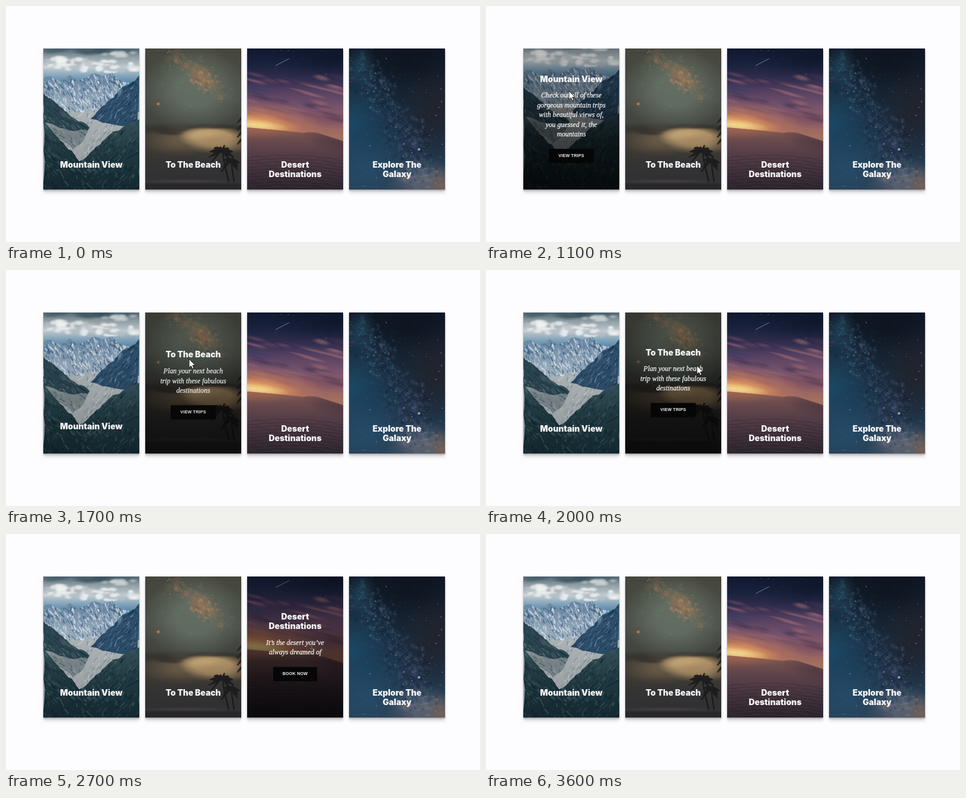
Write an HTML page with a canvas that moves like this. It is 800 by 400 pixels and loops after 3.7 s.

```html
<!DOCTYPE html>
<html lang="en">
<head>
<meta charset="utf-8">
<title>Trip cards</title>
<style>
html, body { margin: 0; width: 100%; height: 100%; overflow: hidden; background: #fdfcff; }
#stage { position: relative; width: 800px; height: 400px; overflow: hidden; }
.card {
  position: absolute; top: 72px; width: 161.2px; height: 238.6px; overflow: hidden;
  color: #f5f5f5; text-align: center; background: #222;
  box-shadow: 0 1px 1px rgba(0,0,0,.1), 0 2px 2px rgba(0,0,0,.1),
    0 3px 3px rgba(0,0,0,.1), 0 6px 5px rgba(0,0,0,.12);
}
canvas { position: absolute; left: 0; top: 0; }
.shade {
  position: absolute; left: 0; top: 0; width: 100%; height: 200%;
  background: linear-gradient(transparent 0, rgba(0,0,0,.034) 22%, rgba(0,0,0,.123) 39%,
    rgba(0,0,0,.249) 53%, rgba(0,0,0,.394) 64%, rgba(0,0,0,.54) 74%,
    rgba(0,0,0,.668) 84%, rgba(0,0,0,.762) 94%, rgba(0,0,0,.8) 100%);
}
.content { position: absolute; left: 0; top: 0; width: 100%; white-space: pre; }
.title { font: 900 13.9px/16.4px Inter, "Open Sans", sans-serif; }
.copy { margin-top: 10.9px; font: italic 11.8px/16.4px "Liberation Serif", serif; -webkit-text-stroke: .25px; }
.btn {
  display: inline-block; margin-top: 16.4px; padding: 0 16px; background: #060607;
  font: bold 7.2px/24.3px "Liberation Sans", sans-serif; letter-spacing: .17px;
}
#cursor { position: absolute; left: 0; top: 0; overflow: visible; }
</style>
</head>
<body>
<div id="stage">
  <svg id="cursor" width="1" height="1">
    <path id="arrow" d="M0 0V14.5L3.4 11.4 5.7 16.5 8 15.5 5.8 10.5H10.3Z" fill="#fff" stroke="#111" stroke-width=".9"/>
    <path id="beam" d="M-3 -6.5H-.8L0 -5.8 .8 -6.5H3M0 -5.8V5.8M-3 6.5H-.8L0 5.8 .8 6.5H3" fill="none" stroke="#777" stroke-width="1"/>
  </svg>
</div>
<script>
const W = 162, H = 262, LOOP = 3700, STEP = 100, REST = 188.8;
let c, seed;

function rnd() {
  seed = (seed + 0x6D2B79F5) | 0;
  let t = Math.imul(seed ^ (seed >>> 15), 1 | seed);
  t = (t + Math.imul(t ^ (t >>> 7), 61 | t)) ^ t;
  return ((t ^ (t >>> 14)) >>> 0) / 4294967296;
}
const spread = (mid, range) => mid + (rnd() + rnd() - 1) * range;
const pick = list => list[Math.floor(rnd() * list.length)];

function wash(y0, y1, ...stops) {
  const g = c.createLinearGradient(0, y0, 0, y1);
  stops.forEach(([at, color]) => g.addColorStop(at, color));
  return g;
}

// An elliptic light; core is the share of the radius at full strength
function glow(x, y, rx, ry, rgb, alpha, turn = 0, core = 0) {
  const g = c.createRadialGradient(0, 0, 0, 0, 0, 1);
  g.addColorStop(core, `rgba(${rgb},${alpha})`);
  g.addColorStop((1 + core) / 2, `rgba(${rgb},${alpha * .5})`);
  g.addColorStop(1, `rgba(${rgb},0)`);
  c.save();
  c.translate(x, y);
  c.rotate(turn);
  c.scale(rx, ry);
  c.fillStyle = g;
  c.fillRect(-1, -1, 2, 2);
  c.restore();
}

// A closed outline roughened by midpoint displacement
function ridge(pts, rough) {
  for (let k = 0; k < 3; k++) {
    pts = pts.flatMap(([x, y], i) => {
      const [u, v] = pts[(i + 1) % pts.length];
      const d = Math.min(1, Math.hypot(u - x, v - y) / 20) * rough;
      return [[x, y], [spread((x + u) / 2, d), spread((y + v) / 2, d)]];
    });
  }
  const p = new Path2D();
  pts.forEach(([x, y]) => p.lineTo(x, y));
  p.closePath();
  return p;
}

function slope(pts, fill, tones, n, lean, rough = 3) {
  const p = ridge(pts, rough);
  const xs = pts.map(q => q[0]), ys = pts.map(q => q[1]);
  const x0 = Math.min(...xs), y0 = Math.min(...ys);
  const w = Math.max(...xs) - x0, h = Math.max(...ys) - y0;
  c.save();
  c.clip(p);
  c.fillStyle = fill;
  c.fillRect(0, 0, W, H);
  c.globalAlpha = .55;
  for (let i = 0; i < n; i++) {
    const x = x0 + rnd() * w, y = y0 + rnd() * h, l = 2 + rnd() * 7;
    c.strokeStyle = pick(tones);
    c.lineWidth = .7 + rnd() * 2;
    c.beginPath();
    c.moveTo(x, y);
    c.lineTo(x + l * spread(lean, .9), y + l);
    c.stroke();
  }
  c.restore();
}

function stars(n, place, tones, size) {
  for (let i = 0; i < n; i++) {
    const [x, y] = place();
    const s = .4 + rnd() * rnd() * size;
    c.globalAlpha = .25 + rnd() * .6;
    c.fillStyle = pick(tones);
    c.fillRect(x, y, s, s);
  }
  c.globalAlpha = 1;
}
const anywhere = () => [rnd() * W, rnd() * H];

function mountain() {
  c.fillStyle = wash(0, 64, [0, '#4f6672'], [.22, '#8f9da3'], [.5, '#c3ccd0'], [.75, '#7fa3bb'], [1, '#4d7f a0'.replace(' ', '')]);
  c.fillRect(0, 0, W, H);
  for (let i = 0; i < 12; i++) glow(rnd() * W, rnd() * 9, 18, 6, '58,80,92', .6);
  for (let i = 0; i < 16; i++) glow(spread(125, 36), spread(10, 5), 9, 4, '206,212,214', .5, 0, .3);
  for (let i = 0; i < 60; i++) {
    const x = rnd() * W;
    glow(x, spread(27 + x / 40, 13), 5 + rnd() * 9, 3 + rnd() * 5, pick(['246,247,247', '234,237,238', '182,192,197']), .75, 0, .35);
  }
  slope([[0, 52], [12, 47], [30, 56], [44, 45], [56, 54], [70, 50], [86, 42], [100, 47], [116, 41], [126, 52], [144, 58], [150, 124], [0, 124]],
    wash(40, 124, [0, '#6383a3'], [.5, '#8da5ba'], [1, '#b2c0cb']),
    ['#f1f4f6', '#34587b', '#d5dfe7', '#2b4c6c', '#e6ecf0', '#7493ae', '#fff'], 620, .4);
  slope([[0, 108], [W, 108], [W, H], [0, H]], '#b0b8bb', ['#d6dadb', '#8b989e', '#c3c9cb', '#77878e', '#e2e4e4'], 420, -.7, 0);
  slope([[162, 46], [152, 56], [138, 63], [124, 76], [108, 90], [92, 106], [80, 119], [104, 126], [162, 132]],
    '#2f506c', ['#1b3a55', '#4c7497', '#15304a', '#7f9aab', '#24466a'], 320, -.8);
  slope([[0, 76], [16, 88], [36, 106], [60, 124], [78, 134], [74, 141], [52, 142], [24, 134], [0, 126]],
    '#2a4652', ['#152c37', '#4c656a', '#6b7c7e', '#213d48'], 200, .9);
  slope([[0, 124], [24, 132], [52, 140], [76, 140], [66, 158], [50, 172], [34, 158], [14, 142]],
    '#7f8c90', ['#56686f', '#a5aeb0', '#3f555d', '#8f9a9d'], 130, .9);
  slope([[162, 120], [134, 133], [112, 146], [94, 164], [74, 182], [60, 192], [76, 222], [100, 262], [162, 262]],
    wash(120, 250, [0, '#3a5560'], [.4, '#244049'], [1, '#17323d']), ['#10262f', '#3f5d62', '#18323d', '#566d6c'], 420, -.8);
  slope([[0, 124], [18, 144], [34, 160], [50, 176], [62, 192], [78, 222], [102, 262], [0, 262]],
    wash(124, 250, [0, '#35505a'], [.4, '#223d46'], [1, '#17313b']), ['#0f242d', '#3f5a5c', '#17303a', '#5b7172'], 360, .8);
  for (let i = 0; i < 14; i++) glow(spread(78, 30), spread(196, 30), 4 + rnd() * 6, 2 + rnd() * 3, '142,156,160', .3, .9);
}

function frond(x, y, angle, len) {
  const dx = Math.cos(angle) * len, dy = Math.sin(angle) * len;
  const curve = t => [x + dx * t, y + dy * t + 9 * t * t];
  c.lineWidth = 1.6;
  c.beginPath();
  for (let t = 0; t <= 1.001; t += .1) {
    const [u, v] = curve(t);
    c.moveTo(u, v);
    c.lineTo(u + dx * .14 - 1, v + 6 * Math.sin(Math.PI * (.2 + t * .7)));
    c.moveTo(u, v);
    c.lineTo(...curve(t + .1));
  }
  c.stroke();
}

function palm(x, y, footX, len) {
  c.strokeStyle = '#202122';
  c.lineWidth = 2.4;
  c.beginPath();
  c.moveTo(x, y);
  c.quadraticCurveTo(x + 2, y + 18, footX, 226);
  c.stroke();
  for (let i = 0; i < 10; i++) frond(x, y, -Math.PI * 1.15 + i * Math.PI * 1.3 / 9, spread(len, 4));
}

function beach() {
  c.fillStyle = wash(0, H, [0, '#45453c'], [.3, '#4c5149'], [.5, '#454741'], [.56, '#3a3936'], [1, '#343437']);
  c.fillRect(0, 0, W, H);
  glow(84, 70, 86, 76, '104,116,104', .85, 0, .35);
  for (let i = 0; i < 70; i++) {
    const t = rnd();
    glow(spread(46 + t * 88, 24), spread(6 + t * 78, 20), 7, 5, pick(['142,106,82', '134,96,86', '152,122,88', '112,106,92']), .32, .8);
  }
  glow(96, 50, 36, 20, '164,126,86', .55, .75);
  for (let i = 0; i < 40; i++) glow(spread(98, 24), spread(53, 20), 4, 3, pick(['206,162,102', '186,136,86', '150,96,80']), .45, .8);
  for (let i = 0; i < 16; i++) glow(spread(112, 30), spread(58, 26), 5, 2.5, '104,76,70', .4, .8);
  stars(420, () => { const t = rnd(); return [spread(45 + t * 90, 44), spread(t * 92, 36)]; }, ['#c99a70', '#b8767a', '#d6bd90', '#7f9696', '#5c5a50'], 1.3);
  stars(240, () => [rnd() * W, rnd() * 128], ['#949c8c', '#a89f88', '#6c7a70', '#3e423b'], .9);
  glow(22, 94, 4, 4, '222,110,70', .9);
  glow(22, 94, 1.5, 1.5, '255,220,180', 1);
  glow(88, 92, 3, 3, '80,120,150', .6);
  c.fillStyle = wash(126, 146, [0, 'rgba(56,54,50,0)'], [.5, 'rgba(56,54,49,.85)'], [1, '#45413a']);
  c.fillRect(0, 126, W, H);
  glow(60, 156, 66, 28, '122,104,80', .8, 0, .2);
  glow(112, 150, 58, 20, '186,155,110', 1, 0, .55);
  glow(98, 146, 40, 12, '212,180,128', .75, 0, .3);
  glow(124, 162, 56, 18, '176,146,104', .8, 0, .3);
  for (let i = 0; i < 14; i++) glow(spread(30, 36), spread(138, 8), 18, 4, '58,55,50', .6);
  glow(130, 133, 60, 4, '58,55,50', .9);
  c.fillStyle = wash(170, 200, [0, 'rgba(56,55,55,0)'], [1, '#3c3b3d']);
  c.fillRect(0, 170, W, H);
  glow(70, 225, 100, 4, '100,94,84', .6);
  c.fillStyle = '#333335';
  c.fillRect(0, 229, W, H);
  palm(130, 173, 141, 17);
  palm(145, 190, 150, 13);
  c.strokeStyle = '#262724';
  for (let i = 0; i < 4; i++) frond(165, 116 + i * 12, Math.PI * 1.02, 8);
}

function desert() {
  c.fillStyle = wash(0, 150, [0, '#0f182c'], [.2, '#1b243f'], [.36, '#352f50'], [.5, '#5b4464'], [.66, '#7a5670'], [.82, '#96636c'], [1, '#b47a66']);
  c.fillRect(0, 0, W, H);
  glow(150, 14, 110, 40, '13,20,38', .7);
  for (let i = 0; i < 40; i++) {
    const y = 44 + rnd() * 78;
    glow(rnd() * W, y, 14 + rnd() * 26, 2 + rnd() * 4, pick(['66,52,84', '146,98,116', '94,68,98', '160,108,112', '112,76,104']), .55, .24, .3);
  }
  glow(14, 68, 44, 9, '58,62,104', .6, .2);
  glow(140, 118, 60, 18, '116,76,94', .6, .12);
  glow(24, 126, 110, 38, '226,138,92', .85, .12);
  glow(16, 128, 78, 20, '250,180,104', .9, .14, .1);
  glow(16, 130, 56, 10, '255,226,150', .95, .1, .2);
  stars(70, () => [rnd() * W, rnd() * 50], ['#7585a8', '#b4bccf'], .8);
  c.strokeStyle = '#9ca6bb';
  c.lineWidth = .7;
  c.beginPath();
  c.moveTo(48, 29);
  c.lineTo(71, 17);
  c.stroke();
  const dune = new Path2D('M0 134Q50 138 96 143Q108 140 122 144Q144 151 162 157V262H0Z');
  c.save();
  c.clip(dune);
  c.fillStyle = wash(134, H, [0, '#91645c'], [.14, '#775355'], [.4, '#5a424e'], [.7, '#42343f'], [1, '#2c2834']);
  c.fillRect(0, 0, W, H);
  glow(20, 138, 80, 16, '186,112,82', .6);
  glow(150, 160, 60, 20, '78,54,66', .6, .3);
  c.lineWidth = .8;
  for (let i = 0; i < 30; i++) {
    c.strokeStyle = i % 2 ? 'rgba(26,20,32,.32)' : 'rgba(128,94,100,.2)';
    c.beginPath();
    for (let x = 0; x <= W; x += 3) {
      c.lineTo(x, 182 + i * 2.8 - 8 * Math.sin(x / 58) + Math.sin(x / 5 + i * 1.7) + x * .05);
    }
    c.stroke();
  }
  c.restore();
}

function galaxy() {
  c.fillStyle = wash(0, H, [0, '#101724'], [.3, '#172433'], [.6, '#20384f'], [1, '#3c566e']);
  c.fillRect(0, 0, W, H);
  glow(4, 130, 90, 110, '30,90,126', .65);
  glow(30, 215, 90, 66, '44,98,138', .65);
  glow(20, 30, 28, 40, '38,92,120', .6);
  glow(145, 104, 56, 90, '36,36,44', .9);
  glow(100, 20, 80, 50, '13,19,30', .8);
  glow(122, 228, 60, 46, '132,134,150', .75, 0, .1);
  for (let i = 0; i < 300; i++) {
    const t = rnd();
    glow(spread(18 + t * 112, 38), spread(16 + t * 206, 34), 2 + rnd() * 5, 2 + rnd() * 4,
      pick(['66,116,152', '86,86,128', '26,34,52', '44,90,126', '20,28,42']), .32, 1);
  }
  for (let i = 0; i < 70; i++) glow(spread(112, 34), spread(156, 48), 2 + rnd() * 5, 2 + rnd() * 4, pick(['22,26,42', '62,64,98', '104,96,134', '24,28,44']), .42, .9);
  for (let i = 0; i < 90; i++) glow(spread(120, 44), spread(224, 34), 2 + rnd() * 5, 2 + rnd() * 4, pick(['158,158,172', '170,144,132', '96,116,142', '132,140,162']), .32);
  glow(158, 234, 28, 36, '186,140,110', .65);
  stars(600, anywhere, ['#5c93bd', '#86a9c2', '#0e1626', '#54708a'], 1);
  stars(560, () => { const t = rnd(); return [spread(14 + t * 124, 40), spread(20 + t * 220, 34)]; }, ['#7fb4d8', '#cfe2f0', '#a69ad0', '#d8c6bd', '#141c2e'], 1.2);
  for (let i = 0; i < 18; i++) glow(rnd() * W, rnd() * 238, 1.2, 1.2, '214,234,248', .8);
  glow(118, 171, 3, 3, '240,240,255', 1);
}

const cards = [
  { art: mountain, title: 'Mountain View', copy: 'Check out all of these\ngorgeous mountain trips\nwith beautiful views of,\nyou guessed it, the\nmountains', btn: 'VIEW TRIPS', top: 44.2, on: 387, off: 1356 },
  { art: beach, title: 'To The Beach', copy: 'Plan your next beach\ntrip with these fabulous\ndestinations', btn: 'VIEW TRIPS', top: 60.4, on: 1354, off: 2102 },
  { art: desert, title: 'Desert\nDestinations', copy: 'It\u2019s the desert you\u2019ve\nalways dreamed of', btn: 'BOOK NOW', top: 60.4, on: 2102, off: 2900 },
  { art: galaxy, title: 'Explore The\nGalaxy', top: REST, on: LOOP, off: LOOP }
];

const stage = document.getElementById('stage');
const cursor = document.getElementById('cursor');
const arrow = document.getElementById('arrow');
const beam = document.getElementById('beam');

function add(parent, tag, cls, text = '') {
  const el = document.createElement(tag);
  el.className = cls;
  el.textContent = text;
  return parent.appendChild(el);
}

cards.forEach((card, i) => {
  const box = add(stage, 'div', 'card');
  box.style.left = 63.4 + 172 * i + 'px';
  card.image = add(box, 'canvas', '');
  card.image.width = W;
  card.image.height = H;
  c = card.image.getContext('2d');
  seed = 11 + i;
  card.art();
  card.shade = add(box, 'div', 'shade');
  card.content = add(box, 'div', 'content');
  add(card.content, 'div', 'title', card.title);
  card.extras = card.copy ? [add(card.content, 'div', 'copy', card.copy), add(card.content, 'div', 'btn', card.btn)] : [];
});
stage.appendChild(cursor);

// cubic-bezier(.19, 1, .22, 1)
function ease(x) {
  if (x <= 0) return 0;
  if (x >= 1) return 1;
  let lo = 0, hi = 1;
  for (let i = 0; i < 24; i++) {
    const s = (lo + hi) / 2, r = 1 - s;
    if (.57 * s * r * r + .66 * s * s * r + s * s * s < x) lo = s; else hi = s;
  }
  return 1 - (1 - lo) ** 3;
}

function hover(card, t, time, delay = 0) {
  const shown = ease((Math.min(t, card.off) - card.on - delay) / time);
  return shown * (1 - ease((t - card.off) / time));
}

// time, x, y
const path = [[400, 198, 300], [500, 145, 161], [700, 142, 148], [1100, 140, 144], [1200, 146, 145], [1300, 196, 148],
  [1400, 264, 150], [1500, 302, 151], [1700, 309, 151], [1900, 322, 154], [2000, 356, 162], [2100, 406, 174],
  [2200, 490, 186], [2300, 516, 189], [2800, 516, 188]];

function moveCursor(t) {
  const k = path.findIndex(p => p[0] >= t);
  const seen = t >= path[0][0] && k >= 0;
  cursor.style.display = seen ? '' : 'none';
  if (!seen) return;
  const b = path[k], a = path[Math.max(0, k - 1)];
  const f = a === b ? 0 : (t - a[0]) / (b[0] - a[0]);
  cursor.style.transform = `translate(${a[1] + (b[1] - a[1]) * f}px, ${a[2] + (b[2] - a[2]) * f}px)`;
  const text = t === 500 || t >= 2300;
  arrow.style.display = text ? 'none' : '';
  beam.style.display = text ? '' : 'none';
}

const lift = (el, y) => { el.style.transform = `translateY(${y}px)`; };

function draw(t) {
  for (const card of cards) {
    lift(card.image, -.04 * H * hover(card, t, 1050));
    lift(card.shade, -238.6 * hover(card, t, 1400));
    lift(card.content, REST + (card.top - REST) * hover(card, t, 700));
    const p = hover(card, t, 700, 100);
    for (const el of card.extras) {
      lift(el, 10.9 * (1 - p));
      el.style.opacity = p;
    }
  }
  moveCursor(t);
}

const start = performance.now();
function tick() {
  const t = (performance.now() - start) % LOOP;
  draw(Math.floor(t / STEP) * STEP);
  requestAnimationFrame(tick);
}
tick();
</script>
</body>
</html>
```
